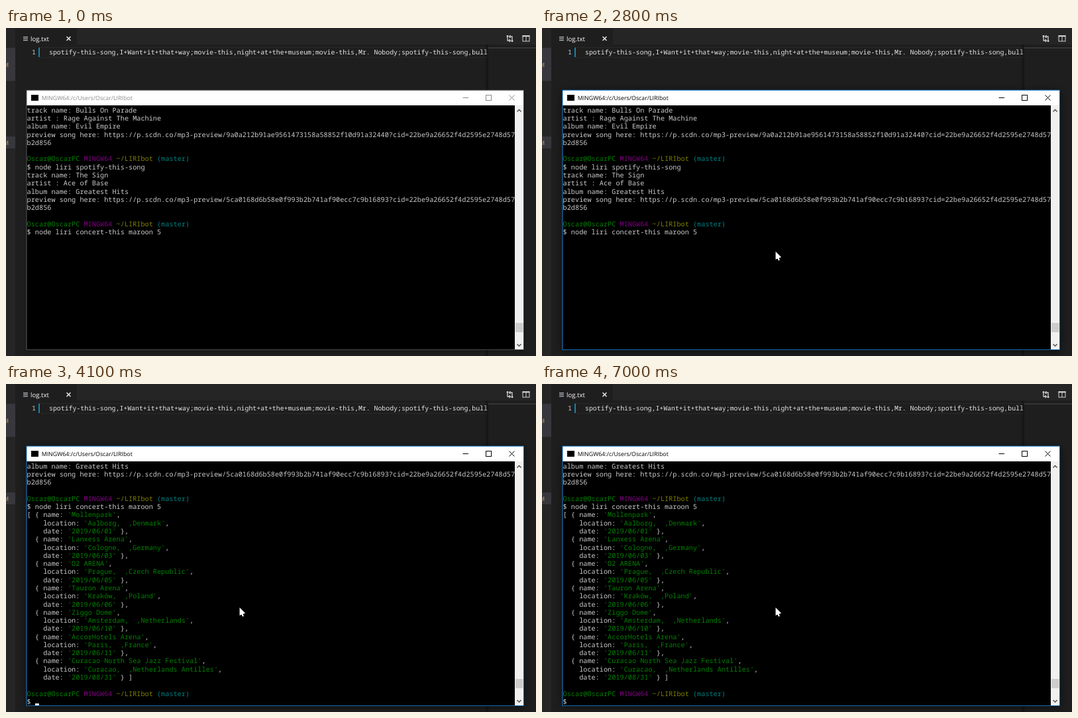
Recreate the animation shown at these times as an HTML page with a canvas. Size 800 px wide and 496 px high, loop 7100 ms.

```html
<!DOCTYPE html>
<html lang="en">
<head>
<meta charset="utf-8">
<title>Terminal session</title>
<style>
html, body { margin: 0; width: 100%; height: 100%; overflow: hidden; background: #1e1e1e; }
canvas { display: block; width: 800px; height: 496px; }
</style>
</head>
<body>
<canvas id="stage" width="800" height="496"></canvas>
<script>
const ctx = document.getElementById('stage').getContext('2d');
const LOOP = 7100, STEP = 100;
const FOCUS = 1300, ENTER = 1700, OUTPUT = 3900, DONE = 4100;
const BLINK = 1060;

const MONO = '"Noto Sans Mono", "DejaVu Sans Mono", monospace';
const SANS = '"Open Sans", "Noto Sans", sans-serif';
const GREY = '#cacaca', GREEN = '#008200';

// Terminal grid
const LEFT = 31.6, TOP = 118, COL = 6.137, ROW = 12.283, ROWS = 30;

const COMMAND = '$ node liri concert-this maroon 5';
const PROMPT = [['Oscar@OscarPC ', GREEN], ['MINGW64 ', '#800080'],
                ['~/LIRIbot ', '#808000'], ['(master)', '#008080']];

const song = (track, artist, album, id) => [
  'track name: ' + track,
  'artist : ' + artist,
  'album name: ' + album,
  `preview song here: https://p.scdn.co/mp3-preview/${id}?cid=22be9a26652f4d2595e2748d57`,
  'b2d856',
  ''
];

const shows = [
  'Mollenpark|Aalborg|Denmark|06/01',
  'Lanxess Arena|Cologne|Germany|06/03',
  'O2 ARENA|Prague|Czech Republic|06/05',
  'Tauron Arena|Kraków|Poland|06/06',
  'Ziggo Dome|Amsterdam|Netherlands|06/10',
  'AccorHotels Arena|Paris|France|06/11',
  'Curacao North Sea Jazz Festival|Curacao|Netherlands Antilles|08/31'
].flatMap((show, i, all) => {
  const [name, city, land, day] = show.split('|');
  return [
    `${i ? ' ' : '['} { name: '${name}',`,
    `    location: '${city},  ,${land}',`,
    `    date: '2019/${day}' }${i < all.length - 1 ? ',' : ' ]'}`
  ];
});

const log = [
  ...song('Bulls On Parade', 'Rage Against The Machine', 'Evil Empire',
    '9a0a212b91ae9561473158a58852f10d91a32440'),
  PROMPT,
  '$ node liri spotify-this-song',
  ...song('The Sign', 'Ace of Base', 'Greatest Hits',
    '5ca0168d6b58e0f993b2b741af90ecc7c9b16893'),
  PROMPT,
  COMMAND,
  ...shows,
  '',
  PROMPT,
  '$ '
];

function rect(x, y, w, h, color) {
  ctx.fillStyle = color;
  ctx.fillRect(x, y, w, h);
}

function line(color, width, ...points) {
  ctx.strokeStyle = color;
  ctx.lineWidth = width;
  ctx.beginPath();
  for (const p of points) ctx.lineTo(...p);
  ctx.stroke();
}

function frame(x, y, w, h, color) {
  ctx.strokeStyle = color;
  ctx.lineWidth = 1;
  ctx.strokeRect(x, y, w, h);
}

function cross(x, y, r, color, width) {
  line(color, width, [x - r, y - r], [x + r, y + r]);
  line(color, width, [x + r, y - r], [x - r, y + r]);
}

// Arrow head pointing up (dir -1) or down (dir 1)
function chevron(x, y, dir) {
  line('#505050', 1.5, [x - 3, y - dir * 1.5], [x, y + dir * 1.5], [x + 3, y - dir * 1.5]);
}

function label(text, x, y, size, color) {
  ctx.font = `${size}px ${SANS}`;
  ctx.fillStyle = color;
  ctx.fillText(text, x, y);
}

// Places each character on a fixed-width grid
function mono(text, x, y, pitch, color) {
  ctx.font = `${pitch / 0.6}px ${MONO}`;
  ctx.fillStyle = color;
  [...text].forEach((ch, i) => {
    if (ch !== ' ') ctx.fillText(ch, x + i * pitch, y);
  });
}

function drawSidebar() {
  rect(0, 0, 14, 496, '#252526');
  rect(0, 30, 14, 50, '#37373d');
  rect(0, 164, 14, 18, '#37373d');
  for (const y of [58.5, 176.5]) label('M', -4, y, 9, '#c0a472');
}

function drawTab() {
  rect(107, 0, 693, 25, '#252526');
  for (let i = 0; i < 3; i++) rect(26, 13 + i * 2.5, 7, 1.2, '#b4bcc4');
  label('log.txt', 37, 19.8, 9.65, '#ffffff');
  cross(94.5, 16, 3, '#f0f0f0', 1.4);

  const icon = '#d0d0d0';
  for (const turn of [0, Math.PI]) {
    ctx.save();
    ctx.translate(760.5, 16);
    ctx.rotate(turn);
    line(icon, 1.3, [-3.5, -3], [-3.5, 3], [0.5, 3]);
    line(icon, 1.2, [-1, 1], [1, 3], [-1, 5]);
    rect(-4.8, -5, 2.6, 2.6, icon);
    ctx.restore();
  }
  frame(780, 12, 10, 8, icon);
  rect(779.5, 11, 11, 2.2, icon);
  rect(784.5, 12, 1, 8, icon);
}

function drawEditor() {
  rect(0, 0, 800, 496, '#1e1e1e');
  drawSidebar();
  drawTab();
  for (const y of [29, 44]) rect(52, y, 675, 1, '#282828');
  rect(49, 29.5, 2, 14.5, '#1b81a8');
  mono('1', 39, 40.2, 5.91, '#d0d0d0');
  mono('spotify-this-song,I+Want+it+that+way;movie-this,night+at+the+museum;' +
       'movie-this,Mr. Nobody;spotify-this-song,bull', 65, 40.2, 5.91, '#e6e6e6');

  const edge = ctx.createLinearGradient(722, 0, 728, 0);
  edge.addColorStop(0, 'rgba(0,0,0,0)');
  edge.addColorStop(1, 'rgba(0,0,0,0.35)');
  rect(722, 25, 6, 471, edge);
  for (let x = 728; x < 799; x += 2) rect(x, 29.5, 1.2, 1.2, '#606060');
}

function drawWindow(active) {
  ctx.save();
  ctx.shadowColor = `rgba(0,0,0,${active ? 0.6 : 0.35})`;
  ctx.shadowBlur = active ? 12 : 7;
  ctx.shadowOffsetY = 2;
  rect(30.5, 93.6, 751.2, 393.2, active ? '#1883d7' : '#5a5a5a');
  ctx.restore();

  rect(31.5, 94.6, 749.5, 22.4, '#ffffff');
  rect(31.5, 117, 736.5, 369, '#000000');
  rect(38, 101, 11, 9, '#000000');

  const ink = active ? '#000000' : '#8a8a8a';
  label('MINGW64:/c/Users/Oscar/LIRIbot', 53.7, 109, 8.82, ink);
  rect(689.5, 105, 8.5, 1, ink);
  frame(724.5, 101.5, 8, 8, ink);
  cross(763.5, 105.5, 4, ink, 1);

  rect(768, 117, 13, 369, '#f0f0f0');
  rect(769, 446, 11.5, 14, '#cdcdcd');
  chevron(774.5, 125, -1);
  chevron(774.5, 479.5, 1);
}

// Line the cursor stands on
function cursorLine(t) {
  const run = log.indexOf(COMMAND);
  if (t < ENTER) return run;
  if (t < OUTPUT) return run + 1;
  return t < DONE ? run + 1 + shows.length : log.length - 1;
}

function cursorShown(t) {
  if (t < FOCUS) return false;
  const start = t < OUTPUT ? ENTER : OUTPUT;
  if (t >= start && t < start + 300) return true;
  const phase = t < OUTPUT ? 90 : 860;
  return (t - phase) % BLINK < BLINK / 2;
}

function drawTerminal(t) {
  const current = cursorLine(t);
  const first = Math.max(0, current - ROWS + 1);
  const typed = log[current].startsWith('$') ? log[current] : '';
  for (let i = first; i <= current; i++) {
    const text = i === current ? typed : log[i];
    const parts = typeof text === 'string'
      ? text.split(/('[^']*')/).map(s => [s, s[0] === "'" ? GREEN : GREY])
      : text;
    let col = 0;
    for (const [part, color] of parts) {
      mono(part, LEFT + col * COL, TOP + (i - first) * ROW + 9.7, COL, color);
      col += part.length;
    }
  }
  if (cursorShown(t)) {
    const y = Math.round(TOP + (current - first) * ROW + 8.8);
    rect(LEFT + typed.length * COL, y, 6, 3, '#e8e8e8');
  }
}

// Eased travel between two points
function glide(a, b, p) {
  const k = 1 - (1 - Math.min(1, Math.max(0, p))) ** 2;
  return a.map((v, i) => v + (b[i] - v) * k);
}

function drawPointer(t) {
  if (t < 100) return;
  const rest = [422, 364];
  const spot = t < 800
    ? glide([786, 300], rest, (t - 100) / 600)
    : glide(rest, [352.6, 338], (t - 800) / 400);
  ctx.save();
  ctx.translate(...spot);
  line('#000000', 3.2, [3, 8], [5.6, 13.8]);
  line('#ffffff', 2.2, [3, 8], [5.4, 13.4]);
  ctx.beginPath();
  for (const p of [[0, 0], [0, 12], [8.5, 8.5]]) ctx.lineTo(...p);
  ctx.fillStyle = '#ffffff';
  ctx.fill();
  ctx.restore();
}

let shown = -1;
function tick() {
  const t = Math.floor(performance.now() % LOOP / STEP) * STEP;
  if (t !== shown) {
    shown = t;
    ctx.textRendering = 'geometricPrecision';
    drawEditor();
    drawWindow(t >= FOCUS);
    drawTerminal(t);
    drawPointer(t);
  }
  requestAnimationFrame(tick);
}
tick();
</script>
</body>
</html>
```
